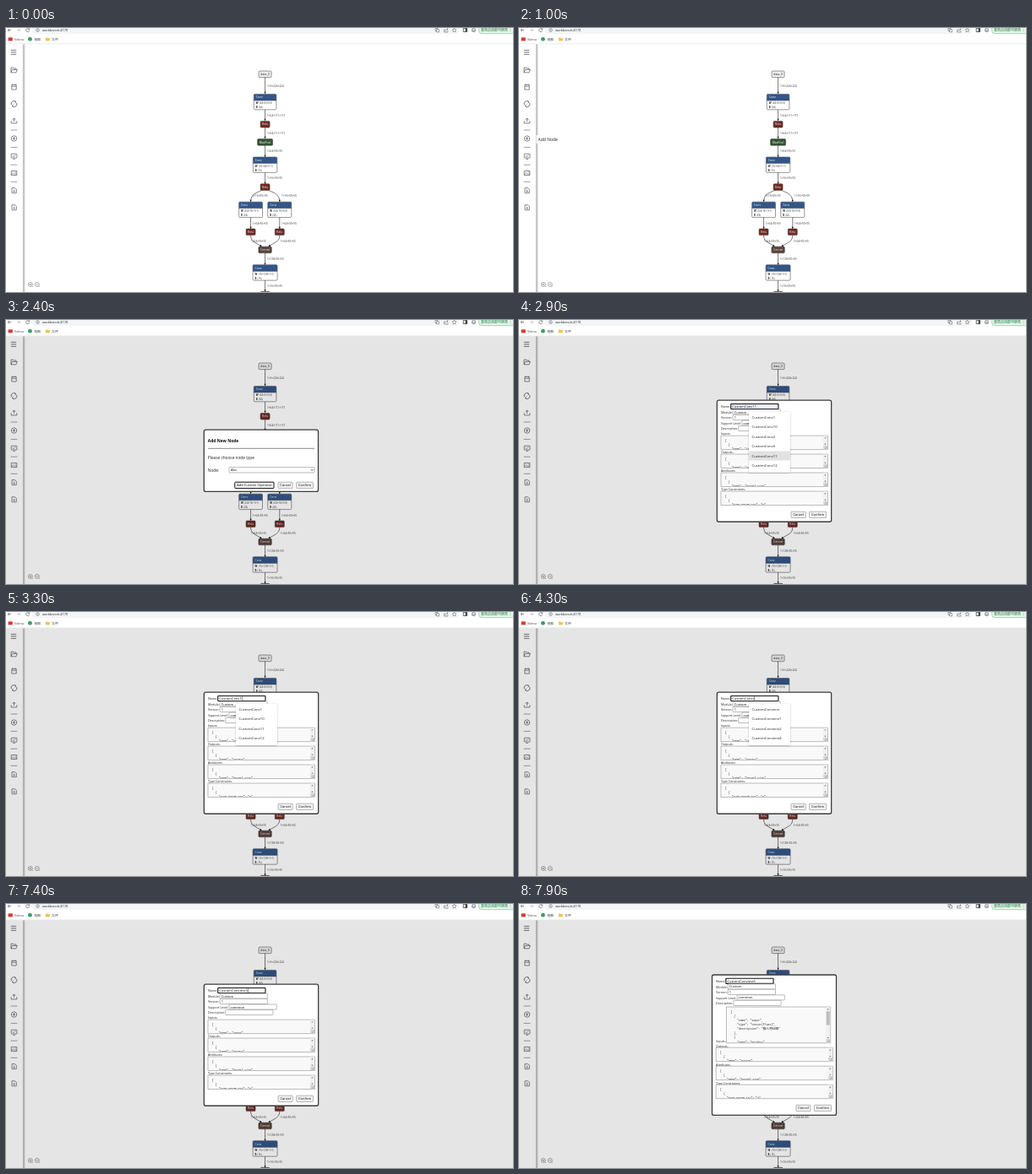
These frames come from a looping animation (600 by 313 pixels, 8 s). An HTML page with a canvas:

```html
<!DOCTYPE html>
<html lang="en">
<head>
<meta charset="utf-8">
<title>Graph editor</title>
<style>
html, body { margin: 0; width: 100%; height: 100%; overflow: hidden; background: #fff; }
canvas { display: block; width: 600px; height: 313px; }
</style>
</head>
<body>
<canvas id="stage" width="600" height="313"></canvas>
<script>
const LOOP = 8000;
const ctx = document.getElementById('stage').getContext('2d');
const UI = '"Open Sans", "Noto Sans CJK SC", "Noto Sans CJK", sans-serif';
const MONO = '"Liberation Mono", monospace';
const CJK = '"Noto Sans CJK SC", "Noto Sans CJK", sans-serif';

// ---------- helpers ----------

// Text is set ten times larger and scaled down so that advances stay fractional.
function text(str, x, y, size, color = '#222', opt = {}) {
  ctx.save();
  ctx.translate(x, y);
  ctx.scale(0.1, 0.1);
  ctx.font = `${opt.weight || 400} ${size * 10}px ${opt.font || UI}`;
  ctx.textAlign = opt.align || 'left';
  ctx.fillStyle = color;
  ctx.fillText(str, 0, 0);
  const width = ctx.measureText(str).width / 10;
  ctx.restore();
  return width;
}

function box(x1, y1, x2, y2, fill, stroke, lw = 0.6, r = 0) {
  ctx.beginPath();
  ctx.roundRect(x1, y1, x2 - x1, y2 - y1, r);
  if (fill) { ctx.fillStyle = fill; ctx.fill(); }
  if (stroke) { ctx.strokeStyle = stroke; ctx.lineWidth = lw; ctx.stroke(); }
}

function path(d, stroke, lw = 0.6, fill) {
  const p = new Path2D(d);
  if (fill) { ctx.fillStyle = fill; ctx.fill(p); }
  if (stroke) { ctx.strokeStyle = stroke; ctx.lineWidth = lw; ctx.stroke(p); }
}

function disc(x, y, r, fill, stroke, lw = 0.7) {
  ctx.beginPath();
  ctx.arc(x, y, r, 0, 7);
  if (fill) { ctx.fillStyle = fill; ctx.fill(); }
  if (stroke) { ctx.strokeStyle = stroke; ctx.lineWidth = lw; ctx.stroke(); }
}

// ---------- browser bars ----------

function browser() {
  const g = '#5f6368';
  box(0, 0, 600, 19, '#fff');
  box(31, -4, 536, 7, '#f4f5f6', null, 0, 4);
  path('M6 2.5H2.2M4 .7L2.2 2.5L4 4.3', g, 0.7);
  path('M13 2.5H16.8M15 .7L16.8 2.5L15 4.3', '#b5b8bb', 0.7);
  path('M27.3 1.4A2 2 0 1 0 27.6 3.2M27.8 .3V1.9H26', g, 0.7);
  disc(37.5, 2.5, 1.8, null, g, 0.6);
  path('M37.5 2.2V3.6M37.5 1.3V1.7', g, 0.5);
  text('workbench:4170', 43, 4.2, 3.9, '#202124');

  box(508, 0.4, 511, 3.6, null, g, 0.6);
  box(509.6, 1.8, 512.4, 4.8, '#fff', g, 0.6);
  path('M520 2H518.6V4.9H523V3.6M520 3.4Q520.4 1.6 523 1.5M521.8 .3L523.1 1.5L521.8 2.7', g, 0.6);
  path('M530.5 .1L531.2 1.7L533 1.9L531.7 3.1L532 4.8L530.5 3.9L529 4.8L529.3 3.1L528 1.9L529.8 1.7Z', g, 0.5);
  box(541.2, 0.3, 545.6, 4.5, null, '#3c4043', 0.8);
  box(543.6, 0.3, 545.6, 4.5, '#3c4043');
  disc(553.5, 2.4, 2.7, '#a9adb2');
  disc(553.5, 1.6, 0.9, '#fff');
  box(559.6, -3, 602, 6.6, '#e9f5ec', '#7fc695', 0.7, 3.5);
  text('重新启动即可更新', 562, 3.9, 4, '#137333', { font: CJK });
  path('M597 1.4V1.9M597 2.6V3.1M597 3.8V4.3', '#137333', 0.6);

  box(2.6, 11.2, 7.8, 15.2, '#d93a2f', null, 0, 0.5);
  text('Velmo', 10, 14.8, 3.75, '#3c4043');
  disc(28.4, 13.2, 2.4, '#34a266');
  text('地图', 33.2, 14.7, 3.9, '#3c4043', { font: CJK });
  path('M46.8 11.4H48.8L49.5 12.1H51.8V15.3H46.8Z', null, 0, '#f5c646');
  text('文件', 54, 14.7, 3.9, '#3c4043', { font: CJK });
  box(0, 18.6, 600, 19.2, '#e3e5e7');
}

// ---------- sidebar ----------

function sidebar() {
  const c = '#555';
  box(0, 19.2, 20.6, 313, '#fff');
  const shade = ctx.createLinearGradient(19.8, 0, 23, 0);
  shade.addColorStop(0, '#d8d8d8');
  shade.addColorStop(0.35, '#b4b4b4');
  shade.addColorStop(1, '#ffffff');
  ctx.fillStyle = shade;
  ctx.fillRect(19.8, 19.2, 3.2, 294);

  path('M5.8 26.3H12.2M5.8 28.8H12.2M5.8 31.3H12.2', c, 0.8);
  path('M6 52.8V47H8.4L9.2 48H12V49.4M6 52.8L7.3 49.4H13.3L12 52.8Z', c, 0.7);
  box(6.8, 67.3, 12.2, 73, null, c, 0.7);
  path('M8 66.5V68M11 66.5V68M7 69.3H12', c, 0.7);
  path('M6.4 91.2A3.2 3.2 0 0 1 11.4 87.4M12.6 88.9A3.2 3.2 0 0 1 7.6 92.7', c, 0.8);
  path('M10.2 86.5L12 87.8L10.4 89.2M8.8 90.9L7.1 92.4L8.9 93.6', c, 0.7);
  path('M9.5 111V107M7.6 108.8L9.5 106.9L11.4 108.8M6.2 110.2V112.9H12.8V110.2', c, 0.7);
  for (const y of [121, 141.4, 162.2, 182.3]) path(`M5.6 ${y}H13.4`, '#777', 0.7);
  disc(9.5, 131, 3.2, null, c, 0.7);
  path('M7.7 131H11.3M9.5 129.2V132.8', c, 0.7);
  box(6.2, 149.2, 12.9, 154, null, c, 0.7, 0.5);
  path('M7.8 151.4L9.1 152.6L11.3 150.4M8.3 155.4H10.8', c, 0.7);
  box(6.2, 169.5, 12.8, 174.6, null, c, 0.7);
  path('M6.4 174L8.4 171.6L10 173.4L11 172.4L12.6 174', c, 0.6);
  disc(11.2, 171, 0.5, c);
  for (const y of [192.6, 212.8]) {
    path(`M7 ${y - 3}H10.6L12.3 ${y - 1.3}V${y + 3}H7Z`, c, 0.7);
    path(`M9.6 ${y - 1.2}V${y + 1.6}M8.4 ${y + 0.5}L9.6 ${y + 1.7}L10.8 ${y + 0.5}`, c, 0.6);
  }
}

function zoomIcons() {
  for (const x of [28.8, 36.8]) {
    disc(x, 304, 2.5, null, '#777', 0.6);
    path(`M${x - 1.2} 304H${x + 1.2}M${x + 1.8} 305.8L${x + 3} 307`, '#777', 0.6);
  }
  path('M28.8 302.8V305.2', '#777', 0.6);
}

// ---------- graph ----------

const RED = '#702921', GREEN = '#335533', BROWN = '#59423b', BLUE = '#335588';

function node(label, cx, top, w, fill, color = '#fff') {
  box(cx - w / 2, top, cx + w / 2, top + 7.6, fill, '#333', 0.5, 1.2);
  text(label, cx, top + 5, 3.4, color, { align: 'center' });
}

function conv(cx, top, w, weights, bias) {
  const l = cx - w / 2, r = cx + w / 2;
  box(l, top, r, top + 18.4, '#fff', '#333', 0.5, 1.2);
  ctx.beginPath();
  ctx.roundRect(l, top, w, 7.6, [1.2, 1.2, 0, 0]);
  ctx.fillStyle = BLUE;
  ctx.fill();
  path(`M${l} ${top + 7.6}H${r}`, '#333', 0.4);
  text('Conv', l + 2.4, top + 5, 3.4, '#fff');
  text('W', l + 2.4, top + 12, 2.9, '#222', { weight: 700 });
  text(`⟨${weights}⟩`, l + 6.4, top + 12, 2.9, '#333');
  text('B', l + 2.4, top + 16.7, 2.9, '#222', { weight: 700 });
  text(`⟨${bias}⟩`, l + 5.2, top + 16.7, 2.9, '#333');
}

function arrow(d, x, y) {
  path(d, '#222', 0.6);
  path(`M${x - 1.1} ${y - 2.2}H${x + 1.1}L${x} ${y}Z`, null, 0, '#111');
}

const shape = (str, x, y) => text(str, x, y, 3.15, '#333');

function graph() {
  const X = 306.6, L = 289.6, R = 323.8;
  const spine = [[58, 78, '1×3×224×224', 70], [97, 110, '1×64×111×111', 105],
    [118, 131, '1×64×111×111', 126], [139, 153, '1×64×55×55', 147.2],
    [171, 185, '1×16×55×55', 179.2], [267, 281, '1×128×55×55', 275],
    [299, 312.5, '1×16×55×55', 306.6]];
  for (const [y1, y2, label, y] of spine) {
    arrow(`M${X} ${y1}V${y2}`, X, y2);
    shape(label, 309, y);
  }
  for (const [x, s] of [[L, -1], [R, 1]]) {
    arrow(`M${X + s * 4} 192.4C${x - s * 5} 196 ${x} 198 ${x} 206`, x, 206);
    arrow(`M${x} 224V238`, x, 238);
    path(`M${x} 245.6C${x} 253 ${x - s * 5} 254 ${X + s * 4} 259`, '#222', 0.6);
    path(`M${X + s * 4} 259.2L${X + s * 6.6} 258.7L${X + s * 5.2} 256.7Z`, null, 0, '#111');
  }
  shape('1×16×55×55', 291.5, 200.2);
  shape('1×16×55×55', 326, 200.2);
  shape('1×64×55×55', 291.8, 232.6);
  shape('1×64×55×55', 326, 232.6);
  shape('1×64×55×55', 290, 253.8);
  shape('1×64×55×55', 324.8, 253.8);

  node('data_0', X, 51, 15, '#eee', '#222');
  conv(X, 78.4, 26.6, '64×3×3×3', 64);
  node('Relu', X, 110.4, 11, RED);
  node('MaxPool', X, 131.6, 18, GREEN);
  conv(X, 153, 28.4, '16×64×1×1', 16);
  node('Relu', X, 184.8, 11, RED);
  conv(L, 206.2, 27.8, '64×16×1×1', 64);
  conv(R, 206.2, 28, '64×16×3×3', 64);
  node('Relu', L, 238, 11, RED);
  node('Relu', R, 238, 11, RED);
  node('Concat', X, 259.2, 15.4, BROWN);
  conv(X, 280.8, 29, '16×128×1×1', 16);
  node('Relu', X, 312.4, 11, RED);
}

function tooltip(alpha) {
  ctx.globalAlpha = alpha;
  box(20.5, 127, 47, 137, '#fff');
  text('Add Node', 22.6, 134.2, 5, '#222');
  ctx.globalAlpha = 1;
}

// ---------- dialogs ----------

function panel(l, t, r, b) {
  box(l, t, r, b, '#fff', '#3c3c3c', 1.3, 2);
}

function button(label, x1, x2, y, fill = '#efefef', focus = false) {
  box(x1, y, x2, y + 7.4, fill, focus ? '#111' : '#777', focus ? 1 : 0.5, 0.8);
  text(label, (x1 + x2) / 2, y + 5.1, 4.05, '#111', { align: 'center' });
}

function typeDialog(t) {
  const pressed = t >= 2400, hover = t >= 2100;
  panel(234.3, 130.2, 369.5, 203.4);
  text('Add New Node', 238.8, 145.1, 4.95, '#111', { weight: 700 });
  path('M239 152.3H365', '#555', 0.7);
  text('Please choose node type', 238.8, 165.2, 4.77);
  text('Node:', 238.8, 179.6, 4.77);
  box(264, 174.6, 365, 181, '#fff', pressed ? '#777' : '#111', pressed ? 0.5 : 1, 0.6);
  text('Abs', 266, 179.4, 4.05, '#111');
  path('M361 177.2L362.2 178.5L363.4 177.2', '#111', 0.7);
  button('Add Custom Operator', 270.8, 317, 192.2, pressed ? '#f5f5f5' : hover ? '#e3e3e3' : '#efefef', pressed);
  button('Cancel', 322, 339.2, 192.2);
  button('Confirm', 343.6, 363.6, 192.2);
}

const INPUT_SPEC = ['[', '  {', '    "name": "input",', '    "type": "tensor(float)",',
  '    "description": "输入特征图"', '  },', '  {', '    "name": "weights",'];
const head = s => ['[', '  {', `    ${s},`];

function codeLine(str, x, y) {
  const indent = str.length - str.trimStart().length;
  x += indent * 1.92;
  for (const part of str.trim().split(/([\u4e00-\u9fff]+)/)) {
    const wide = /[\u4e00-\u9fff]/.test(part);
    x += text(part, x, y, wide ? 3.7 : 3.2, '#222', { font: wide ? CJK : MONO });
  }
}

function textarea(l, t, r, h, lines) {
  const b = t + h;
  box(l, t, r, b, '#f9f9f9', '#777', 0.5);
  ctx.save();
  ctx.beginPath();
  ctx.rect(l, t, r - l - 6, h - 0.5);
  ctx.clip();
  lines.forEach((s, i) => codeLine(s, l + 5, t + 7 + i * 5.08));
  ctx.restore();
  const x = r - 3;
  box(r - 5.6, t + 0.4, r - 0.4, b - 0.4, '#f0f0f0');
  path(`M${x - 1.1} ${t + 3.2}L${x} ${t + 2}L${x + 1.1} ${t + 3.2}Z`, null, 0, '#555');
  path(`M${x - 1.1} ${b - 6.8}L${x} ${b - 5.6}L${x + 1.1} ${b - 6.8}Z`, null, 0, '#555');
  if (h > 20) box(x - 2, t + 5.2, x + 2, t + 5.2 + h * 0.38, '#bdbdbd');
  box(r - 5.2, b - 4.8, r - 0.4, b - 0.4, '#d6d6d6');
  path(`M${r - 3.6} ${b - 0.8}L${r - 0.8} ${b - 3.6}M${r - 1.8} ${b - 0.8}L${r - 0.8} ${b - 1.8}`, '#777', 0.5);
}

function formDialog(s) {
  const inline = s.areaH > 20;
  const areaTop = inline ? 38 : 42;
  const half = (areaTop + s.areaH + 85.6) / 2;
  const l = 302 - s.width / 2, r = 302 + s.width / 2;
  const top = 167.2 - half, bottom = 167.2 + half;
  const x = l + 4.6, right = r - 4.2;
  panel(l, top, r, bottom);

  const fields = [['Name:', 11.8, ''], ['Module:', 14.2, 'Custom'], ['Version:', 14.2, '1'],
    ['Support Level:', 25, 'common'], ['Description:', 20.8, '']];
  fields.forEach(([label, dx, value], i) => {
    const y = top + 4.3 + i * 6.5, active = i === 0 && s.focus;
    text(label, x, y + 4.9, 3.6);
    box(x + dx, y, x + dx + 56.2, y + 6.1, active && s.preview ? '#e8f0fe' : '#fff',
      active ? '#111' : '#777', active ? 1.1 : 0.5, 0.5);
    const w = text(i ? value : s.name, x + dx + 1.5, y + 4.6, 4.05, '#111');
    if (active && s.caret) box(x + dx + 1.7 + w, y + 0.9, x + dx + 2.2 + w, y + 5.2, '#111');
  });

  let y = top + areaTop;
  text('Inputs:', x, inline ? y + s.areaH - 0.4 : y - 0.7, 3.6);
  textarea(inline ? x + 12.3 : x, y, inline ? right - 2.6 : right, s.areaH, INPUT_SPEC);
  y += s.areaH + 5.4;
  for (const [label, line] of [['Outputs:', '"name": "output"'],
    ['Attributes:', '"name": "kernel_size"'], ['Type Constraints:', '"type_param_str": "T"']]) {
    text(label, x, y - 0.7, 3.6);
    textarea(x, y, right, 16.5, head(line));
    y += 22;
  }
  button('Cancel', r - 47.6, r - 30.4, bottom - 12.1);
  button('Confirm', r - 26.1, r - 6, bottom - 12.1);
  if (s.list) suggestions(s.list, s.hover);
}

function suggestions(items, hover) {
  const pitch = 11.4, t = 108.4, b = t + items.length * pitch + 4;
  ctx.save();
  ctx.shadowColor = 'rgba(0,0,0,.28)';
  ctx.shadowBlur = 2;
  ctx.shadowOffsetY = 0.5;
  box(272, t, 321, b, '#fff', null, 0, 0.8);
  ctx.restore();
  items.forEach((end, i) => {
    const y = t + 1.4 + i * pitch;
    if (i === hover) box(272, y, 321, y + 11.2, '#e2e2e2');
    text('CustomConv' + end, 275.5, y + 7.2, 4.25, '#222');
  });
}

// ---------- timeline ----------

const ALL = ['1', '10', '2', '3', '11', '12'];
const ONES = ['1', '10', '11', '12'];
const TESTS = ['test', 'test1', 'test2', 'test4'];

// time, text after the prefix (null: empty field), list, highlighted row
const STEPS = [
  [2600, null], [2700, null, ALL], [2800, '3', ALL, 3], [2900, '11', ALL, 4],
  [3000, '11'], [3200, '1', ONES], [3400, '', ALL], [4300, 't', TESTS],
  [4600, 'te', TESTS], [4900, 'tes', TESTS], [5100, 'test', TESTS], [5700, 'test5'],
];

function formState(t) {
  const [at, end, list, hover] = STEPS.filter(s => s[0] <= t).pop();
  const preview = hover !== undefined;
  const since = at === 5700 ? t - 5400 : t - at;
  return {
    name: end === null ? '' : 'CustomConv' + end,
    list, hover, preview,
    focus: t >= 2700,
    caret: !preview && t < 7800 && since % 1000 < 500,
    areaH: t < 7800 ? 16.5 : t < 7900 ? 30 : 42.8,
    width: t < 7800 ? 135.3 : t < 7900 ? 141 : 147,
  };
}

function draw(t) {
  ctx.fillStyle = '#fff';
  ctx.fillRect(0, 0, 600, 313);
  graph();
  sidebar();
  zoomIcons();
  if (t >= 900 && t < 1400) tooltip(t < 1000 ? 0.5 : 1);
  if (t >= 1400) {
    ctx.fillStyle = 'rgba(0,0,0,.1)';
    ctx.fillRect(0, 19, 600, 294);
    if (t < 2600) typeDialog(t);
    else formDialog(formState(t));
  }
  browser();
}

const start = performance.now();
function tick() {
  draw((performance.now() - start) % LOOP);
  requestAnimationFrame(tick);
}
tick();
</script>
</body>
</html>
```
